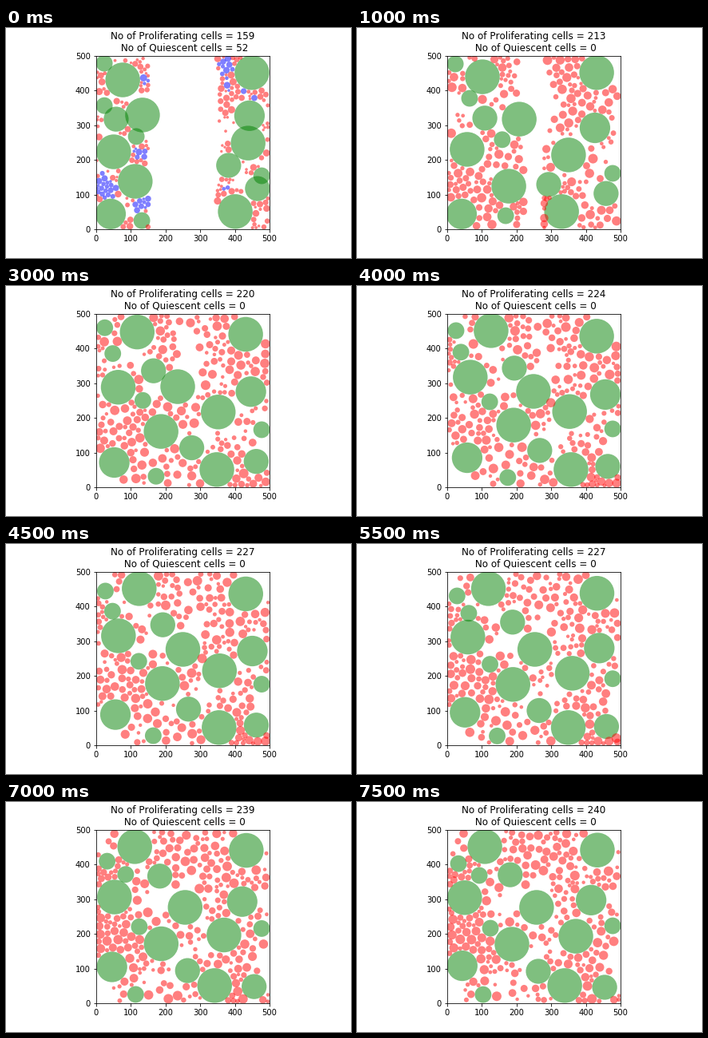
A matplotlib script that plays this animation: 432 by 288 pixels, repeating every 8 s.

```python
import numpy as np
import matplotlib.pyplot as plt
from matplotlib.animation import FuncAnimation
from matplotlib.collections import PatchCollection
from matplotlib.patches import Circle

plt.rcParams["font.family"] = "DejaVu Sans"
plt.rcParams["text.kerning_factor"] = 6
rng = np.random.default_rng(11)

FRAMES, STEP, SIZE = 16, 500, 500
MID = SIZE / 2
PROLIFERATING = [159, 212, 213, 213, 215, 218, 220, 222,
                 224, 227, 227, 227, 233, 239, 239, 240]
QUIESCENT = [52] + [0] * (FRAMES - 1)
GREEN, RED, BLUE = (0, 0.5, 0, 0.5), (1, 0, 0, 0.5), (0, 0, 1, 0.5)

# Large cells by radius: waypoints (x + iy) reached at the times in KEYS
KEYS = [0, 1000, 4000, 7500]
LARGE = {
    50: [(77+430j, 102+439j, 127+451j, 109+451j),
         (134+329j, 208+317j, 249+276j, 258+276j),
         (51+223j, 58+230j, 67+317j, 51+304j),
         (113+138j, 178+124j, 192+179j, 187+170j),
         (449+451j, 431+451j, 431+435j, 433+441j),
         (438+248j, 350+214j, 353+218j, 371+193j),
         (401+51j, 330+51j, 357+51j, 339+51j)],
    44: [(42+44j, 42+44j, 58+85j, 44+108j),
         (442+327j, 426+292j, 456+267j, 415+297j)],
    36: [(58+317j, 109+320j, 194+343j, 182+370j),
         (382+184j, 293+129j, 267+106j, 263+92j),
         (465+117j, 458+103j, 463+60j, 454+46j)],
    24: [(24+478j, 24+476j, 26+451j, 33+402j),
         (24+356j, 65+377j, 40+389j, 93+368j),
         (116+267j, 159+258j, 123+246j, 125+216j),
         (132+25j, 169+39j, 175+28j, 104+25j),
         (477+154j, 477+161j, 477+168j, 477+223j)],
}
times = np.arange(FRAMES) * STEP
large_r = np.array([r for r, paths in LARGE.items() for _ in paths], float)
routes = [np.interp(times, KEYS, path) for paths in LARGE.values() for path in paths]
large_xy = np.stack([np.column_stack([z.real, z.imag]) for z in routes], axis=1)


def offsets(p, q):
    d = p[:, None] - q[None]
    return d, np.hypot(d[..., 0], d[..., 1]) + 1e-6


def push(p, r, other, other_r):
    d, dist = offsets(p, other)
    if other is p:
        np.fill_diagonal(dist, 1e6)
    lap = np.clip(r[:, None] + other_r - dist, 0, None)
    return (d * (lap / dist)[..., None]).sum(axis=1)


def relax(p, r, k, rounds, pad=1.0):
    """Separate the cells while they stay in the box and out of the wound."""
    edge = 0.9 * r[:, None]
    wound = max(0, MID - 150 - 35 * k)
    for _ in range(rounds):
        p = p + 0.35 * push(p, pad * r, p, pad * r)
        p = p + 0.7 * push(p, r, large_xy[k], large_r)
        x = p[:, 0] - MID
        p[:, 0] = MID + np.where(x < 0, -1, 1) * np.maximum(abs(x), wound)
        p = np.clip(p, edge, SIZE - edge)
    return p


def carry(p, k):
    """Drag small cells along with the nearest large ones."""
    _, dist = offsets(p, large_xy[k - 1])
    w = np.clip(dist - large_r, 5, None) ** -2
    shift = large_xy[k] - large_xy[k - 1]
    return p + w @ shift / w.sum(axis=1, keepdims=True)


def seed(n):
    """Random points in the two outer strips, clear of the large cells."""
    p = rng.uniform(0, SIZE, (8000, 2))
    free = (offsets(p, large_xy[0])[1] > large_r + 3).all(axis=1)
    return p[free & (abs(p[:, 0] - MID) > 100)][:n]


def radii(phase, k):
    grown = 5 + 9 * ((phase + 0.025 * k) % 1) ** 1.2
    return grown * min(1, 0.75 + 0.12 * k)


def simulate():
    counts = np.add(PROLIFERATING, QUIESCENT)
    phase = rng.random(counts.max())
    p = seed(counts[0])
    # The most crowded cells are the quiescent ones, listed last
    p = p[np.argsort((offsets(p, p)[1] < 28).sum(axis=1), kind="stable")]
    states = []
    for k, n in enumerate(counts):
        r = radii(phase[:n], k)
        if k:
            parents = p[rng.integers(len(p), size=n - len(p))]
            p = carry(np.vstack([p, parents + rng.normal(size=parents.shape)]), k)
            p = p + rng.normal(scale=5, size=p.shape)
            p = relax(p, r, k, 30, pad=1.2)
            p = p + rng.normal(scale=3, size=p.shape)
        p = relax(p, r, k, 30)
        states.append((p, r))
    return states


states = simulate()

fig, ax = plt.subplots(figsize=(6, 4), dpi=72, facecolor="white")
fig.subplots_adjust(left=0.125, right=0.9, bottom=0.125, top=0.88)
ticks = range(0, SIZE + 1, 100)
ax.set(xlim=(0, SIZE), ylim=(0, SIZE), aspect="equal", xticks=ticks, yticks=ticks)
title = ax.set_title("", fontsize=12)
cells = ax.add_collection(PatchCollection([], linewidths=0))


def draw(k):
    p, r = states[k]
    centres = np.vstack([large_xy[k], p])
    sizes = np.concatenate([large_r, r])
    cells.set_paths([Circle(c, s) for c, s in zip(centres, sizes)])
    cells.set_facecolor([GREEN] * len(large_r) + [RED] * PROLIFERATING[k]
                        + [BLUE] * QUIESCENT[k])
    title.set_text(f"No of Proliferating cells = {PROLIFERATING[k]}\n"
                   f" No of Quiescent cells = {QUIESCENT[k]}")
    return cells, title


anim = FuncAnimation(fig, draw, frames=FRAMES, interval=STEP,
                     repeat=True, repeat_delay=0, blit=False)
plt.show()
```
